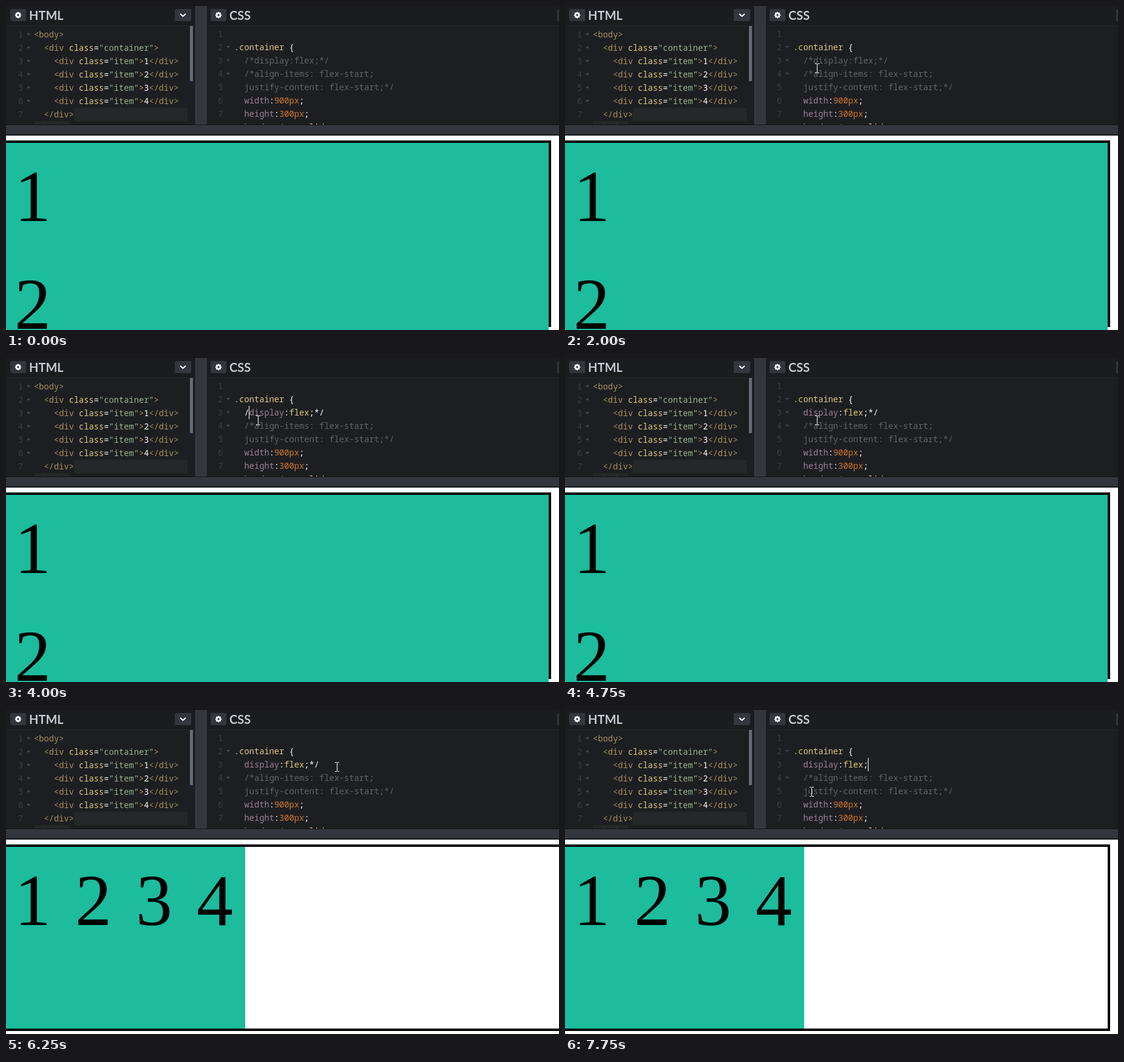
Recreate the animation shown at these times as an HTML page with a canvas. Size 911x535 px, loop 8 s.

```html
<!DOCTYPE html>
<html lang="en">
<head>
<meta charset="utf-8">
<title>Flex container demo</title>
<style>
html, body { margin: 0; width: 100%; height: 100%; overflow: hidden; background: #fff; }
canvas { display: block; }
</style>
</head>
<body>
<canvas id="stage" width="911" height="535"></canvas>
<script>
const ctx = document.getElementById('stage').getContext('2d');
const LOOP = 8000, CHAR = 8.235, LINE = 22;
const HTML_X = 46, CSS_X = 376, HTML_BASE = 52, CSS_BASE = 51;
const BAR = '#34363e', EDITOR = '#1d1e22', TEAL = '#1cbc9c';
const color = {
  tag: '#a7925a', attr: '#ddca7e', string: '#96b38a', plain: '#ffffff',
  number: '#d0782a', prop: '#9a8297', comment: '#646464', gutter: '#3d3f46'
};

// Each entry holds from its start time until the next one.
const pointers = [
  [0], [250, 'arrow', 438, 418], [500, 'arrow', 451, 352], [750, 'arrow', 426, 265],
  [1000, 'beam', 433, 196], [1250, 'beam', 416, 148], [1500, 'beam', 419, 112],
  [1750, 'beam', 415, 105], [2000, 'beam', 415, 103], [5000, 'beam', 557, 84],
  [5250, 'beam', 552, 89], [5500, 'beam', 545, 94], [7500, 'beam', 440, 115],
  [7750, 'beam', 406, 135]
];
// Caret column, or -1 while it is hidden.
const carets = [
  [0, -1], [2750, 4], [3000, -1], [3500, 4], [4000, 3], [4250, 2], [4750, -1],
  [5500, 2], [5750, 17], [6250, -1], [6500, 16], [6750, 15], [7250, -1], [7750, 15]
];
const declaration = [['display', 'prop'], [':', 'plain'], ['flex', 'attr']];
const edits = [
  [0, [['/*display:flex;*/', 'comment']]],
  [4000, [['/', 'plain'], ...declaration, [';*/', 'plain']]],
  [4250, [...declaration, [';*/', 'plain']]],
  [6500, [...declaration, [';*', 'plain']]],
  [6750, [...declaration, [';', 'plain']]]
];

const at = (steps, t) => steps.findLast(step => step[0] <= t);

function rect(x, y, w, h, fill) {
  ctx.fillStyle = fill;
  ctx.fillRect(x, y, w, h);
}

function roundRect(x, y, w, h, fill) {
  ctx.fillStyle = fill;
  ctx.beginPath();
  ctx.roundRect(x, y, w, h, 2.5);
  ctx.fill();
}

function text(str, x, y, font, fill) {
  ctx.font = font;
  ctx.fillStyle = fill;
  ctx.fillText(str, x, y);
}

function code(tokens, x, y, column = 0) {
  for (const [str, kind] of tokens) {
    text(str, x + column * CHAR, y, '13.73px "Noto Sans Mono", monospace', color[kind]);
    column += str.length;
  }
}

function gutter(x, base, foldable) {
  for (let i = 0; i < 7; i++) {
    const y = base + i * LINE;
    code([[String(i + 1), 'gutter']], x, y);
    if (!foldable.includes(i + 1)) continue;
    ctx.fillStyle = '#45474e';
    ctx.beginPath();
    ctx.moveTo(x + 14, y - 7);
    ctx.lineTo(x + 20, y - 7);
    ctx.lineTo(x + 17, y - 3);
    ctx.fill();
  }
}

function gear(x, y) {
  ctx.strokeStyle = '#fff';
  ctx.lineWidth = 2.2;
  ctx.beginPath();
  for (let i = 0; i < 8; i++) {
    const c = Math.cos(i * Math.PI / 4), s = Math.sin(i * Math.PI / 4);
    ctx.moveTo(x + c * 3, y + s * 3);
    ctx.lineTo(x + c * 5.2, y + s * 5.2);
  }
  ctx.stroke();
  ctx.beginPath();
  ctx.arc(x, y, 2.8, 0, 7);
  ctx.stroke();
}

function header(x, title) {
  roundRect(x, 5, 26, 20, BAR);
  gear(x + 13, 15);
  text(title, x + 31, 22.5, 'bold 20px Lato, sans-serif', '#c7c9d3');
}

function htmlPane() {
  header(7, 'HTML');
  roundRect(278, 5, 27, 20, BAR);
  ctx.strokeStyle = '#fff';
  ctx.lineWidth = 2;
  ctx.beginPath();
  ctx.moveTo(287, 13);
  ctx.lineTo(291.5, 17);
  ctx.lineTo(296, 13);
  ctx.stroke();

  rect(112, 168, 187, 22, '#26272b');
  rect(46, 190, 58, 7, '#26272b');
  rect(303, 33, 5, 91, '#696c77');
  gutter(20, HTML_BASE, [1, 2, 3, 4, 5, 6]);

  const open = name => [['<div ', 'tag'], ['class', 'attr'], ['=', 'plain'],
    [`"${name}"`, 'string'], ['>', 'tag']];
  const lines = [
    [0, [['<body>', 'tag']]],
    [2, open('container')],
    ...[1, 2, 3, 4].map(n => [4, [...open('item'), [String(n), 'plain'], ['</div>', 'tag']]]),
    [2, [['</div>', 'tag']]]
  ];
  lines.forEach(([indent, tokens], i) => code(tokens, HTML_X, HTML_BASE + i * LINE, indent));
  ctx.globalAlpha = 0.5;
  code([['</body>', 'tag']], HTML_X, HTML_BASE + 7 * LINE);
  ctx.globalAlpha = 1;
}

function cssPane(t) {
  header(337, 'CSS');
  roundRect(908, 5, 8, 20, BAR);
  gutter(349, CSS_BASE, t < 5000 ? [2, 3, 4] : [2, 4]);
  const size = (name, value) =>
    [[name, 'prop'], [':', 'plain'], [value, 'number'], [';', 'plain']];
  const lines = [
    [],
    [['.container', 'attr'], [' {', 'plain']],
    at(edits, t)[1],
    [['/*align-items: flex-start;', 'comment']],
    [['justify-content: flex-start;*/', 'comment']],
    size('width', '900px'),
    size('height', '300px'),
    [['border', 'prop'], [':', 'plain'], ['4px', 'number'], [' solid', 'attr']]
  ];
  lines.forEach((tokens, i) => code(tokens, CSS_X, CSS_BASE + i * LINE, i === 1 ? 0 : 2));
  const column = at(carets, t)[1];
  if (column >= 0) rect(Math.floor(CSS_X + column * CHAR), 79, 1, 22, '#fff');
}

function preview(t) {
  const flex = t >= 5000;
  const right = flex && t < 7500 ? 920 : 898;
  rect(0, 214, 911, 321, '#fff');
  rect(0, 222, right, 308, '#000');
  rect(0, 226, right - 4, 300, '#fff');
  if (flex) rect(0, 226, 394, 300, TEAL);
  else rect(0, 226, 894, 309, TEAL);
  for (let i = 0; i < 4; i++) {
    text(String(i + 1), flex ? 14 + i * 100 : 14, flex ? 355 : 355 + i * 178,
      '120px "Liberation Serif", serif', '#000');
  }
}

function pointer([, kind, x, y]) {
  if (kind === 'beam') {
    rect(x - 3, y - 8, 3, 1, '#fff');
    rect(x + 1, y - 8, 3, 1, '#fff');
    rect(x, y - 7, 1, 14, '#fff');
    rect(x - 3, y + 7, 3, 1, '#fff');
    rect(x + 1, y + 7, 3, 1, '#fff');
  } else if (kind === 'arrow') {
    const shape = new Path2D('M0 0V16L4 12.5L6.5 18.5L9 17.5L6.5 11.5H11.5Z');
    ctx.save();
    ctx.translate(x + 0.5, y + 0.5);
    ctx.fillStyle = '#fff';
    ctx.strokeStyle = '#000';
    ctx.lineWidth = 1;
    ctx.fill(shape);
    ctx.stroke(shape);
    ctx.restore();
  }
}

function draw(t) {
  rect(0, 0, 911, 214, EDITOR);
  rect(0, 0, 911, 33, '#1b1c20');
  rect(0, 32, 911, 1, '#25262b');
  htmlPane();
  cssPane(t);
  rect(312, 0, 19, 197, BAR);
  rect(312, 0, 1, 197, '#42444c');
  rect(0, 196, 911, 18, BAR);
  rect(0, 196, 911, 1, '#0d0d10');
  rect(0, 197, 911, 1, '#42444c');
  rect(0, 212, 911, 2, '#17181b');
  preview(t);
  pointer(at(pointers, t));
}

const start = performance.now();
function frame() {
  draw((performance.now() - start) % LOOP);
  requestAnimationFrame(frame);
}
frame();
</script>
</body>
</html>
```
